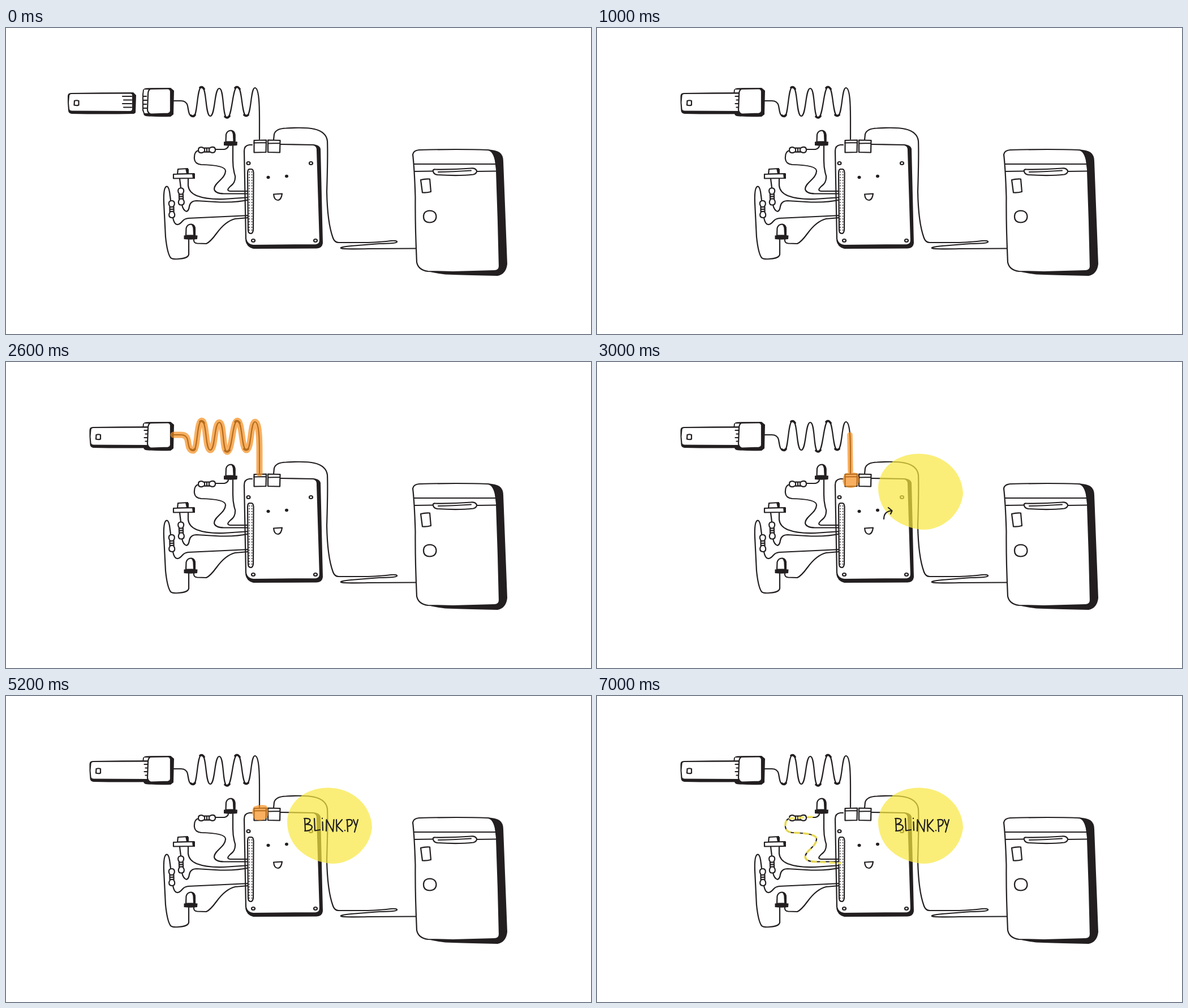
These frames come from a looping animation (1034 px wide and 542 px high, 8000 ms). An HTML page:

```html
<!DOCTYPE html>
<html lang="en">
<head>
<meta charset="utf-8">
<title>Blinking board</title>
<style>
html, body { margin: 0; width: 100%; height: 100%; overflow: hidden; background: #fff; }
svg { display: block; width: 100vw; height: 100vh; }
.line { fill: none; stroke: #231f20; stroke-width: 2.2; stroke-linecap: round; stroke-linejoin: round; }
.solid { fill: #fff; }
.ink { fill: #231f20; stroke: none; }
.thick { stroke-width: 3.8; }
.orange { fill: #f68e1c; stroke-linecap: round; stroke-linejoin: round; opacity: .7; }
.sun { fill: #f8e73f; stroke: none; opacity: .7; }
.flow { fill: none; stroke: #f8e85c; stroke-width: 4; stroke-linecap: round; opacity: .88; }
.dash { stroke-dasharray: 7 9; }
.sparse { stroke-dasharray: 8 11; }
</style>
</head>
<body>
<svg viewBox="0 0 1034 542">
<defs>
  <path id="coil" d="M296 129H309Q319 129 321 138C323 148 323 157 331 157S337 104 346 104S352 156 361 156S368 107 377 107S382 159 391 159S400 104 409 104S416 156 425 156S432 106 440 106C447 106 448 135 448 160V197"/>
  <g id="resistor">
    <path d="M-15 0Q-15 -5 -10 -5Q-7 -5 -6 -3.500H6Q7 -5 10 -5Q15 -5 15 0Q15 5 10 5Q7 5 6 3.500H-6Q-7 5 -10 5Q-15 5 -15 0Z"/>
    <path d="M-4 -3V3M0 -3V3M4 -3V3"/>
  </g>
  <g id="led">
    <path class="solid" d="M-8.500 0L-8 -13Q-6 -20 1 -20Q7 -19 7.500 -12V0Z"/>
    <path class="ink" d="M0 -20Q8.500 -20 8.500 -11V0H4.500L4 -11Q4 -17 0 -20Z"/>
    <path class="ink" d="M-12 0Q0 -1.500 12 0L11.500 6.500Q0 8 -12 6.500Z"/>
  </g>
</defs>

<g class="line">
  <!-- plug, memory stick and coiled cable -->
  <path class="ink" d="M242 110Q243 107 248 106.500Q270 106 291 106L297 111L296 153L291 157Q268 158 247 156Q243 155 243 151L241 146V118Z"/>
  <path fill="#fff" stroke="none" d="M244 109H252V151H245L243 145V118Z"/>
  <path d="M242 121H248M242 128H249M243 135H248M243 142H249"/>
  <g id="stick">
    <path class="ink" d="M109 121Q109 115 115 115Q170 114 225 114L230 119L229 150L226 152Q170 153 116 152Q110 151 110 146L109 132Z"/>
    <path fill="#fff" stroke="none" d="M112 121Q112 117 116 117L220 116.500Q223 116.500 223 119L223 143Q223 147 219 147L116 146.500Q112 146 112 143L111 132Z"/>
    <path d="M121 129Q125 127.500 128.500 129L128.500 136.500Q125 138 120.500 136.500Z"/>
    <path d="M206 121H222M208 127.500H222M206 134H222M208 140.500H222"/>
  </g>
  <path class="solid" d="M255 108Q251 110 251 118L250 145Q251 152 257 152.500L286 151.500Q291 151 291 146V112Q290 107.500 286 107.500Z"/>
  <use href="#coil"/>
  <path class="thick" d="M327 155Q331 158 334 154M343 105.500Q347 103 350 108M387 157Q391 161 395 156M405 106Q409 102 413 108M421 154Q425 157 428 154"/>

  <!-- cable to the fridge -->
  <path d="M473 198L474 188Q477 178 495 177.500Q530 175.500 545 179Q566 184 568 200Q569 225 567 290Q568 345 578 372Q581 380 588 380H640Q665 379 680 377Q692 376 691 379Q688 382 660 382L610 386Q590 388 592 390Q596 392 640 391L725 390.500"/>

  <!-- board -->
  <path class="ink" d="M540 206Q554 206 556 214L560 381Q559 390 549 390.500L437 391Q425 388 423 376L500 370Z"/>
  <path fill="#fff" stroke="none" d="M427 207Q421 209 421 218L424 374Q426 384 437 385L548 384Q555 383 555 376L550 214Q549 207 543 207Z"/>
  <path d="M435 207H430Q421 208 421 218L424 374Q426 384 437 385L548 384Q555 383 555 376L550 214Q549 208 543 207L485 206"/>
  <path class="solid" d="M438.500 199L460 198.500L459.500 220L438.500 220.500ZM463 198.500L484.500 199L484 220.500L463 220ZM438 203.500L460 203M463 204.500L484 204"/>
  <g id="holes"></g>
  <ellipse class="ink" cx="463.500" cy="264.500" rx="3" ry="2.800"/>
  <ellipse class="ink" cx="496" cy="262.500" rx="3" ry="2.800"/>
  <path d="M473 294.500L488 293.500Q486.500 304 481 305Q474 305 473 294.500Z"/>

  <!-- wires -->
  <path d="M393 208Q393 213 386 215H370M340 217Q332 219 333 232Q334 241 345 242Q388 243 388 253C388 267 368 274 368 285Q369 293 385 293.500H430"/>
  <path d="M401 209V235Q401 250 405 262Q406 274 397 280Q388 288 396 289H430"/>
  <path d="M307 267L309 283M322 267V279Q323 291 337 297Q355 304 385 303L430 300M311 313Q313 323 319 325Q323 324 324 316Q326 306 337 306L370 308Q405 310 430 304"/>
  <path d="M291 305L289 290Q287 279 283 281Q278 284 279 310L282 370Q285 399 291 407Q294 410 305 409Q322 408 323 401V374M295 336Q297 347 302 348Q306 349 312 342Q315 338 322 337L430 332"/>
  <path d="M332 374Q331 381 338 381.500L354 382Q361 379 372 364Q388 342 405 338L428 336"/>

  <path class="solid" d="M430 250H434Q437.500 251 437.500 257L437 358Q436 364 433 364Q428 364 428 358L427 257Q427 251 430 250Z"/>
  <path id="pins" stroke-width="1.900"/>

  <!-- parts -->
  <path class="solid" d="M304 250L321 249L322 258L303 258.500ZM296 259L332.500 258V266L296 266.500Z"/>
  <path class="ink" d="M317 249L323 250V258H319ZM329 258H334V267H330Z"/>
  <use class="solid" href="#resistor" transform="translate(355 216) rotate(-1)"/>
  <use class="solid" href="#resistor" transform="translate(309.500 298.500) rotate(88)"/>
  <use class="solid" href="#resistor" transform="translate(293 321) rotate(89)"/>
  <use href="#led" x="397" y="201.500"/>
  <use href="#led" x="326.500" y="367.500"/>

  <!-- fridge -->
  <path class="ink" d="M850 215Q866 216 872 220Q879 225 879 236L883 340L886 418Q884 436 869 439Q820 438 790 437Q768 437 742 430Z"/>
  <path class="solid" d="M719 224Q720 217 730 216Q800 214 852 216Q861 217 865 234L867 250L870 340L872 422Q872 430 863 430L790 432L746 431Q729 429 726 415Q723 350 723.500 300Q722 250 719 224Z"/>
  <path d="M721 241H866M722 254L755 253.500M832 254L867 253.500"/>
  <path class="solid" d="M759 250.500Q754 250 755 254Q756 259 762 260Q800 262.500 826 259.500Q832 258 832 253Q830 248 822 248.500Q790 251 759 250.500Z"/>
  <path d="M764 255Q790 254.500 822 252.500M733 269Q740 267 749 267.500L751 290Q744 292 736 291.500ZM738 334Q738 324 749 323.500Q760 324 760.500 334Q760 344 749 344.500Q738 344 738 334Z"/>
</g>

<!-- overlays, each shown between two times -->
<use data-on="2000 3000" class="orange" href="#coil" style="fill: none; stroke: #f68e1c; stroke-width: 11"/>
<g data-on="3000 4000" class="orange">
  <path d="M447 129L448 193" stroke="#f68e1c" stroke-width="9.500"/>
  <path d="M439 197Q450 194 460 197Q464 203 463 213Q460 222 450 223Q439 223 436 217Q431 208 439 197Z"/>
</g>
<path data-on="4000 6000" class="orange" d="M438 196Q449 191 460 194Q465 200 463 212Q460 219 450 220.500Q439 221 437 214Q433 204 438 196Z"/>
<path data-on="3000 8000" class="sun" d="M497 222C498 188 530 162 570 162.500C612 163 646 193 647 233C644 268 612 298 575 297C530 292 497 265 497 222Z"/>
<path data-on="3000 4000" class="line" d="M507 278Q507 265 520 263.500M515 258L521.500 263.500L519 269"/>
<g data-on="4000 8000" class="line" role="img" aria-label="BLINK.PY">
  <path d="M528 217L529 239M527 217Q538 216 537.500 221Q536 226 529 227.500Q541 227 541 232.500Q540 239 528 239"/>
  <path d="M545 217L546 238.500L555 237M559.500 223L560 238M559 216.500V217"/>
  <path d="M566 239L566.500 219L578 240L579.500 219M584 219L584.500 239.500M594 219L585 230L595 240M599 238V238.500"/>
  <path d="M603 219L604 240M602 219.500Q612 217 612 223.500Q611 230 604 231M614 219L618 229M622 219L616 241"/>
</g>
<g data-on="6000 7000">
  <path class="sun" d="M386 203L387 188Q389 178 398 179Q407 181 407 190V203Z"/>
  <path class="flow" d="M374 185.500L383 187.500M379 171L385 176.500M402 169.500L400 176M416 181.500L409 185M393 209Q392 214 386 215"/>
  <path class="flow sparse" d="M533 272Q522 281 495 285Q470 288 430 288.500L396 289Q388 288 397 280Q407 274 406 262Q402 250 402 235V206"/>
</g>
<path data-on="7000 8000" class="flow dash" d="M380 214L340 217Q332 219 333 232Q334 241 345 242Q388 243 388 253C388 267 368 274 368 285Q369 293 385 293.500L430 296"/>
</svg>

<script>
const LOOP = 8000;
const PLUG_IN = 1000;
const stick = document.getElementById("stick");

document.getElementById("holes").innerHTML = [[428.5, 239.5], [539, 239.5], [437, 376.5], [547, 376.5]]
  .map(([x, y]) => `<ellipse cx="${x}" cy="${y}" rx="3" ry="2.500"/>`).join("");

let dots = "";
for (let row = 0; row < 22; row++) {
  const y = 255 + row * 4.9;
  dots += `M430 ${y}h.01M434.500 ${y}h.01`;
}
document.getElementById("pins").setAttribute("d", dots);

const overlays = [...document.querySelectorAll("[data-on]")].map(node => {
  const [start, end] = node.dataset.on.split(" ").map(Number);
  return { node, start, end };
});

function draw(time) {
  const t = time % LOOP;
  stick.setAttribute("transform", `translate(${t < PLUG_IN ? 0 : 38.5} 0)`);
  for (const { node, start, end } of overlays) {
    node.style.display = t >= start && t < end ? "" : "none";
  }
}

const began = performance.now();
function tick() {
  draw(performance.now() - began);
  requestAnimationFrame(tick);
}
tick();
</script>
</body>
</html>
```
